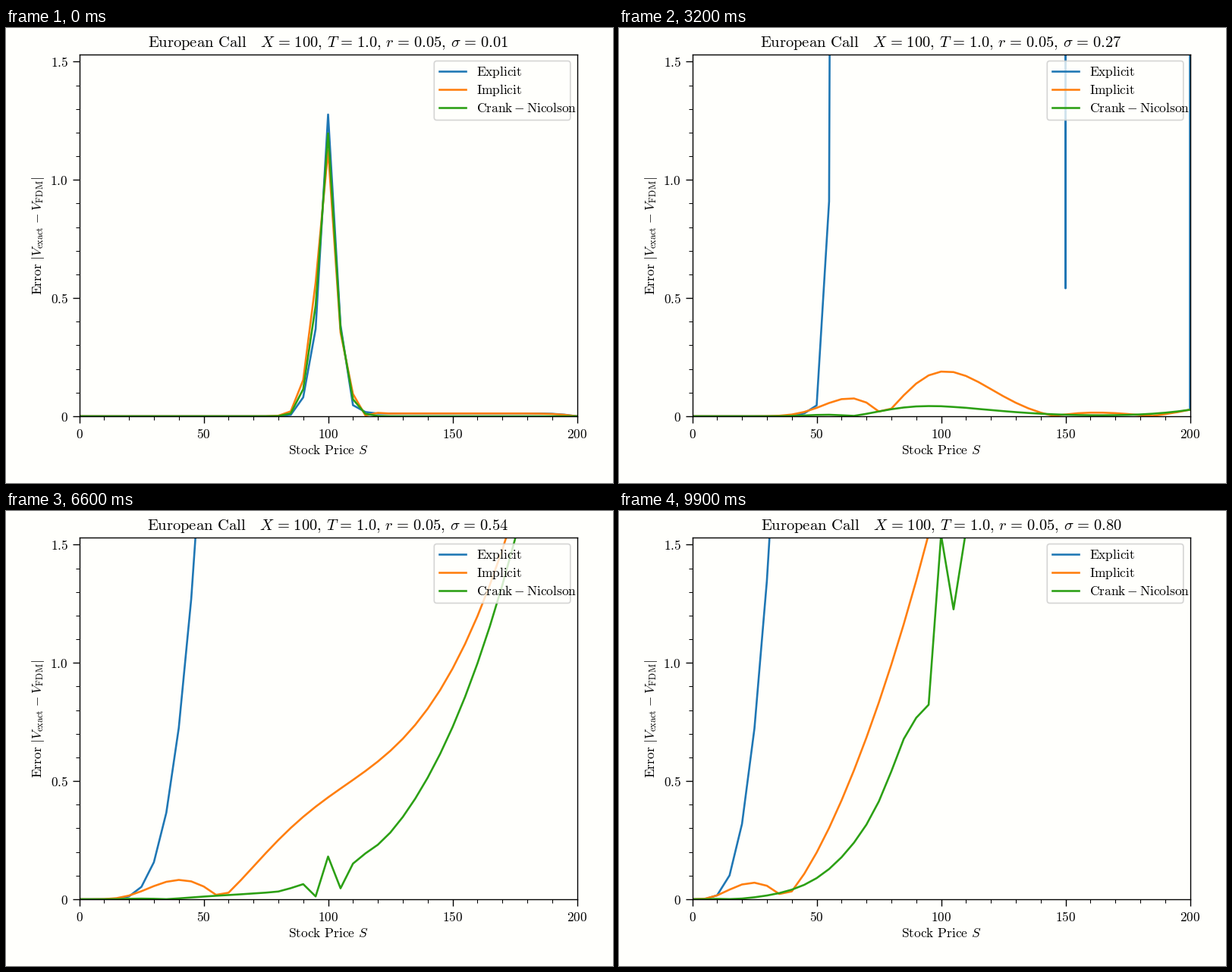
Write a matplotlib script that moves like this. It is 800 px wide and 600 px high and loops after 10 s.

```python
import math

import numpy as np
import matplotlib.pyplot as plt
from matplotlib.animation import FuncAnimation
from matplotlib.patches import FancyBboxPatch
from matplotlib.ticker import MultipleLocator

plt.rcParams["mathtext.fontset"] = "cm"

W, H, DPI = 800, 600, 125
FRAMES = 100
BG = "#fffffc"
X, T, R = 100, 1.0, 0.05
S_MAX, M, N = 200, 40, 10
DT = T / N

S = np.linspace(0, S_MAX, M + 1)
SCHEMES = [("Explicit", 0.0, "#1f77b4"),
           ("Implicit", 1.0, "#ff7f0e"),
           ("Crank-Nicolson", 0.5, "#2ca014")]

norm_cdf = np.vectorize(lambda x: 0.5 * math.erfc(-x / math.sqrt(2)))


def exact_call(sigma):
    """Black-Scholes value at every grid price."""
    s = S[1:]
    vol = sigma * math.sqrt(T)
    d1 = (np.log(s / X) + (R + sigma**2 / 2) * T) / vol
    value = s * norm_cdf(d1) - X * math.exp(-R * T) * norm_cdf(d1 - vol)
    return np.concatenate([[0.0], value])


def fdm_call(sigma, theta):
    """Theta scheme: 0 explicit, 1 implicit, 1/2 in between."""
    j = np.arange(1, M)
    diff, drift = sigma**2 * j**2, R * j
    op = np.zeros((M + 1, M + 1))
    op[j, j - 1] = DT / 2 * (diff - drift)
    op[j, j] = -DT * (diff + R)
    op[j, j + 1] = DT / 2 * (diff + drift)
    eye = np.eye(M + 1)
    left, right = eye - theta * op, eye + (1 - theta) * op
    v = np.maximum(S - X, 0.0)
    for n in range(1, N + 1):
        rhs = right @ v
        rhs[0] = 0.0
        rhs[-1] = S_MAX - X * math.exp(-R * n * DT)
        v = rhs if theta == 0 else np.linalg.solve(left, rhs)
    return v


def roman(text):
    return r"\mathrm{" + text.replace(" ", r"\hspace{0.38}") + "}"


def title_text(sigma):
    eq = r"\hspace{0.12}=\hspace{0.12}"
    parts = [("X", "100"), ("T", "1.0"), ("r", "0.05"),
             (r"\sigma", f"{sigma:.2f}")]
    terms = r",\hspace{0.17}".join(name + eq + val for name, val in parts)
    return "$" + roman("European Call") + r"\hspace{1.1}" + terms + "$"


fig = plt.figure(figsize=(W / DPI, H / DPI), dpi=DPI, facecolor=BG)

ax = fig.add_axes([96.5 / W, 88 / H, 656 / W, 477 / H], facecolor=BG)
ax.set_xlim(0, S_MAX)
ax.set_ylim(0, 1.53)
ax.set_xticks(range(0, 201, 50), [f"${x}$" for x in range(0, 201, 50)])
ax.set_yticks([0, 0.5, 1, 1.5], ["$0$", "$0.5$", "$1.0$", "$1.5$"])
ax.xaxis.set_minor_locator(MultipleLocator(10))
ax.yaxis.set_minor_locator(MultipleLocator(0.1))
ax.tick_params(which="major", length=5, labelsize=10)
ax.tick_params(which="minor", length=3)
curves = [ax.plot([], [], color=color, lw=1.5)[0] for _, _, color in SCHEMES]

# Overlay in pixel units for labels and legend
page = fig.add_axes([0, 0, 1, 1], zorder=5)
page.set_xlim(0, W)
page.set_ylim(H, 0)
page.axis("off")


def label(x, y, text, size=10, ha="center", **kw):
    return page.text(x, y, text, fontsize=size, ha=ha, va="baseline", **kw)


title = label(424.5, 24.6, "", 11.8)
label(424.5, 562.5, "$" + roman("Stock Price ") + "S$")
page.text(47.5, 273.5,
          "$" + roman("Error ") + r"|V_{\mathrm{exact}}\hspace{0.05}-"
          r"\hspace{0.05}V_{\mathrm{FDM}}|$",
          fontsize=10, rotation=90, rotation_mode="anchor",
          ha="center", va="baseline")

page.add_patch(FancyBboxPatch(
    (564.3, 43.5), 179.5, 78, boxstyle="round,pad=0,rounding_size=3.5",
    fc=BG, ec="0.8", lw=1, alpha=0.8))
for k, (name, _, color) in enumerate(SCHEMES):
    y = 56.7 + 24.2 * k
    page.plot([571.3, 606.3], [y, y], color=color, lw=1.5)
    label(620, y + 5.8, "$" + roman(name) + "$", ha="left")


def update(i):
    sigma = 0.01 + 0.79 * i / (FRAMES - 1)
    exact = exact_call(sigma)
    for curve, (_, theta, _) in zip(curves, SCHEMES):
        curve.set_data(S, np.abs(exact - fdm_call(sigma, theta)))
    title.set_text(title_text(sigma))
    return [*curves, title]


anim = FuncAnimation(fig, update, frames=FRAMES, interval=100,
                     repeat=True, repeat_delay=0, blit=False)
plt.show()
```
